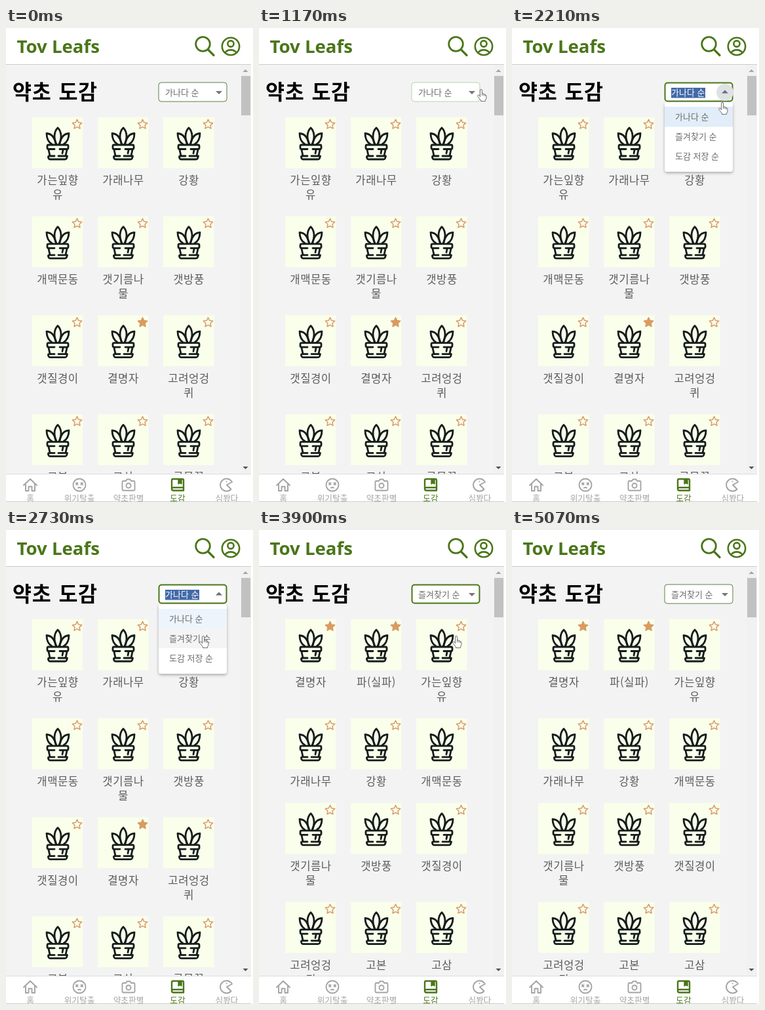
An HTML page that plays this animation: 377x722 px, repeating every 5.2 s.

```html
<!DOCTYPE html>
<html lang="ko">
<head>
<meta charset="utf-8">
<title>약초 도감</title>
<style>
html, body { margin: 0; width: 100%; height: 100%; overflow: hidden; background: #fff; }
svg { display: block; width: 377px; height: 722px; }
text { font-family: "Noto Sans CJK KR", "Noto Sans KR", "Noto Sans CJK", "Noto Sans CJK JP", sans-serif; }
.brand { font: 700 27.6px "Open Sans", "Noto Sans", sans-serif; fill: #4a7619; }
.title { font-size: 31.5px; font-weight: 700; letter-spacing: .7px; word-spacing: 1.5px; }
.name { font-size: 16.7px; font-weight: 300; letter-spacing: .5px; text-anchor: middle; fill: #5c5c5c; }
.small { font-size: 13px; font-weight: 300; fill: #6c6c6c; }
.tab { font-size: 12.7px; font-weight: 300; text-anchor: middle; }
.line { fill: none; stroke-linecap: round; stroke-linejoin: round; }
</style>
</head>
<body>
<svg viewBox="0 0 377 722" xmlns="http://www.w3.org/2000/svg">
  <defs>
    <clipPath id="page"><rect y="56" width="358" height="623"/></clipPath>
    <filter id="shadow" x="-10%" y="-10%" width="120%" height="125%">
      <feDropShadow dx="0" dy="2" stdDeviation="2" flood-opacity=".3"/>
    </filter>
    <g id="plant" class="line" stroke="#141c1c" stroke-width="2.8">
      <path d="M37 41C32.500 32 33 22 39 16C45 22 45.500 32 41 41"/>
      <path d="M36 40C34 30 29 25 22 24.500C22 32 25 38 30 41"/>
      <path d="M42 40C44 30 49 25 56 24.500C56 32 53 38 48 41"/>
      <path d="M34 48.500H25Q23 48.500 23 46.500V44Q23 42 25 42H53Q55 42 55 44V46.500Q55 48.500 53 48.500H42"/>
      <path d="M25 49.500L27 58.500M53 49.500L51 58.500M47 50L46 55"/>
      <path d="M34 59H26Q24 59 24.500 61L25 62.500Q25.500 64 27 64H50Q52 64 52.500 62.500L53.500 59H40"/>
    </g>
  </defs>

  <rect width="377" height="722" fill="#fff"/>
  <rect y="56" width="374" height="623" fill="#f3f3f3"/>
  <text class="title" x="10" y="108.500">약초 도감</text>
  <g clip-path="url(#page)">
    <g id="byName"></g>
    <g id="byStar"></g>
  </g>

  <rect x="358" y="56" width="16" height="623" fill="#f1f1f1"/>
  <rect x="359" y="73" width="14" height="60" fill="#c1c1c1"/>
  <path d="M361.500 67h8l-4-4z" fill="#a3a3a3"/>
  <path d="M361.500 668h8l-4 4z" fill="#505050"/>

  <rect id="box" rx="4" fill="#fff"/>
  <rect id="mark" x="243" y="91" width="52" height="15.500" fill="#4269a8"/>
  <text id="choice" class="small" x="243" y="103"></text>
  <circle id="halo" cx="325" cy="98" r="13"/>
  <path id="arrow"/>
  <g id="menu">
    <rect x="233" y="113" width="104" height="106" rx="4" fill="#fff" filter="url(#shadow)"/>
    <rect id="first" x="233" y="120" width="104" height="30.500"/>
    <rect id="second" x="233" y="150.500" width="104" height="29.500" fill="#f4f4f4"/>
    <text class="small" x="249" y="139.500">가나다 순</text>
    <text class="small" x="249" y="169.500">즐겨찾기 순</text>
    <text class="small" x="249" y="199.500">도감 저장 순</text>
  </g>

  <rect width="374" height="55" fill="#fff"/>
  <path d="M0 55.500H374" stroke="#ccc"/>
  <text class="brand" x="16.500" y="38">Tov Leafs</text>
  <g class="line" stroke="#4a7619">
    <path d="M308.500 33L317 41.500" stroke-width="3.200"/>
    <circle cx="300.500" cy="24.500" r="10.800" stroke-width="2.800"/>
    <circle cx="343" cy="28" r="13.200" stroke-width="2.600"/>
    <circle cx="343" cy="24" r="4.600" stroke-width="2.600"/>
    <path d="M334.500 37.500C338 32 348 32 351.500 37.500" stroke-width="2.600"/>
  </g>

  <rect y="679" width="374" height="43" fill="#fff"/>
  <path d="M0 679.500H374" stroke="#ddd"/>
  <g id="tabs"></g>
  <path d="M0 721.500H374" stroke="#ccc"/>

  <path id="hand" d="M4.500 12V2Q4.500 .500 6 .500T7.500 2V7Q10 6 10 8Q12 7 12.300 9Q14 8.500 14 10.500V13Q14 15 12.500 17V18.500H5.500V17L1 11.500Q0 9.500 1.500 9T4.500 11.500M7.500 7V10M10 8V10.500M12.300 9V11"
    fill="#fff" stroke="#707070" stroke-width="1" stroke-linejoin="round"/>
</svg>

<script>
const LOOP = 5200, STEP = 130;
const GREEN = '#4a7619', ORANGE = '#d99b62';
const $ = id => document.getElementById(id);
const set = (el, attrs) => { for (const k in attrs) el.setAttribute(k, attrs[k]); };
const show = (id, on) => set($(id), { visibility: on ? 'visible' : 'hidden' });

const star = Array.from({ length: 10 }, (_, i) => {
  const r = i % 2 ? 3.7 : 7.6, a = (i / 5 - .5) * Math.PI;
  return (68.5 + r * Math.cos(a)).toFixed(2) + ',' + (11 + r * Math.sin(a)).toFixed(2);
}).join(' ');

// "*" marks a favourite, "/" breaks the label
function card(item, x, y) {
  const lines = item.replace('*', '').split('/');
  const label = lines.map((s, i) => `<text class="name" x="39" y="${102 + 22 * i}">${s}</text>`).join('');
  return `<g transform="translate(${x} ${y})"><rect width="77.5" height="77.5" fill="#f9ffea"/>
    <use href="#plant"/><polygon points="${star}" fill="${item.endsWith('*') ? ORANGE : '#fcfff5'}"
    stroke="${ORANGE}" stroke-width="1.5" stroke-linejoin="round"/>${label}</g>`;
}

function grid(list) {
  const items = list.split(' ');
  let y = 136, out = '';
  for (let i = 0; i < items.length; i += 3) {
    const row = items.slice(i, i + 3);
    out += row.map((item, c) => card(item, 40 + 100 * c, y)).join('');
    y += row.some(s => s.includes('/')) ? 150.8 : 129;
  }
  return out;
}

$('byName').innerHTML = grid('가는잎향/유 가래나무 강황 개맥문동 갯기름나/물 갯방풍 갯질경이 결명자* 고려엉겅/퀴 고본 고삼 골무꽃');
$('byStar').innerHTML = grid('결명자* 파(실파)* 가는잎향/유 가래나무 강황 개맥문동 갯기름나/물 갯방풍 갯질경이 고려엉겅/퀴 고본 고삼');

// Icons are drawn around their own centre
const tabs = [
  ['홈', 'M-10 .5L0 -9L10 .5M-7 -2V9H-2.500V2.500H2.500V9H7V-2'],
  ['위기탈출', 'M-9.500 0a9.500 9.500 0 1 0 19 0a9.500 9.500 0 1 0 -19 0M-5 -3l2.500 2.500m0 -2.500l-2.500 2.500M2.500 -3l2.500 2.500m0 -2.500l-2.500 2.500M-2 4.500Q0 3 2 4.500'],
  ['약초판별', 'M-8 -6H-4L-2.500 -8.500H2.500L4 -6H8Q9.500 -6 9.500 -4.500V7Q9.500 8.500 8 8.500H-8Q-9.500 8.500 -9.500 7V-4.500Q-9.500 -6 -8 -6ZM-3.500 1a3.500 3.500 0 1 0 7 0a3.500 3.500 0 1 0 -7 0'],
  ['도감', 'M-7 -9H7Q9 -9 9 -7V8.500H-6.500Q-9 8.500 -9 6V-7Q-9 -9 -7 -9ZM-9 6Q-9 4 -6.500 4H9M1.500 -9V-2L3.500 -4L5.500 -2V-9M3.500 -9V-5'],
  ['심봤다', 'M6.500 -6.500A9.500 9.500 0 1 0 6.500 6.500L0 0L8 -4.500Q7.500 -6 6.500 -6.500ZM-.500 -5.200h.1']
];
$('tabs').innerHTML = tabs.map(([label, d], i) => {
  const x = 37 + 75 * i, color = i === 3 ? GREEN : '#a4a4a4';
  return `<path class="line" d="${d}" transform="translate(${x} 696)" stroke="${color}" stroke-width="${i === 3 ? 2.4 : 1.9}"/>
    <text class="tab" x="${x}" y="721" fill="${color}">${label}</text>`;
}).join('');

// Pointer path: time, x, y
const path = [
  [650, 368, 122], [1170, 333, 93], [1430, 318, 93], [1820, 318, 93], [2210, 315, 113],
  [2340, 313, 117], [2730, 295, 161], [3900, 295, 161], [4290, 348, 722]
];

function pointer(t) {
  const i = path.findIndex(p => p[0] > t);
  if (i < 1) return null;
  const [a, b] = [path[i - 1], path[i]];
  const k = (t - a[0]) / (b[0] - a[0]);
  return [a[1] + (b[1] - a[1]) * k, a[2] + (b[2] - a[2]) * k];
}

function draw(time) {
  const t = Math.floor(time % LOOP / STEP) * STEP;
  const open = t >= 1820 && t < 3120, sorted = t >= 3120;
  const hover = t >= 1170 && t < 1820, focus = t >= 1820 && t < 4940;

  show('byName', !sorted);
  show('byStar', sorted);
  show('menu', open);
  show('mark', open);
  show('second', open && t >= 2600);
  set($('first'), { fill: t >= 2600 ? '#edf4fc' : '#e1edf8' });

  const w = focus ? 2 : 1, edge = 82.5 + w / 2;
  set($('box'), {
    x: 232.5 + w / 2, y: edge, width: 105 - w, height: 30 - w,
    stroke: hover ? '#b4d8a8' : focus ? GREEN : '#5b8242', 'stroke-width': w
  });
  $('choice').textContent = sorted ? '즐겨찾기 순' : '가나다 순';
  $('choice').style.fill = open ? '#fff' : '#6c6c6c';
  set($('arrow'), {
    d: open ? 'M320 99.500h10l-5-5z' : 'M320 96h10l-5 5z',
    fill: open ? '#66707a' : '#757575'
  });
  show('halo', t >= 1430 && t < 2470);
  set($('halo'), { fill: open ? '#dfe2e5' : '#f5f5f5' });

  const p = pointer(t);
  show('hand', p);
  if (p) set($('hand'), { transform: `translate(${p[0]} ${p[1]})` });
}

const start = performance.now();
function tick() {
  draw(performance.now() - start);
  requestAnimationFrame(tick);
}
tick();
</script>
</body>
</html>
```
